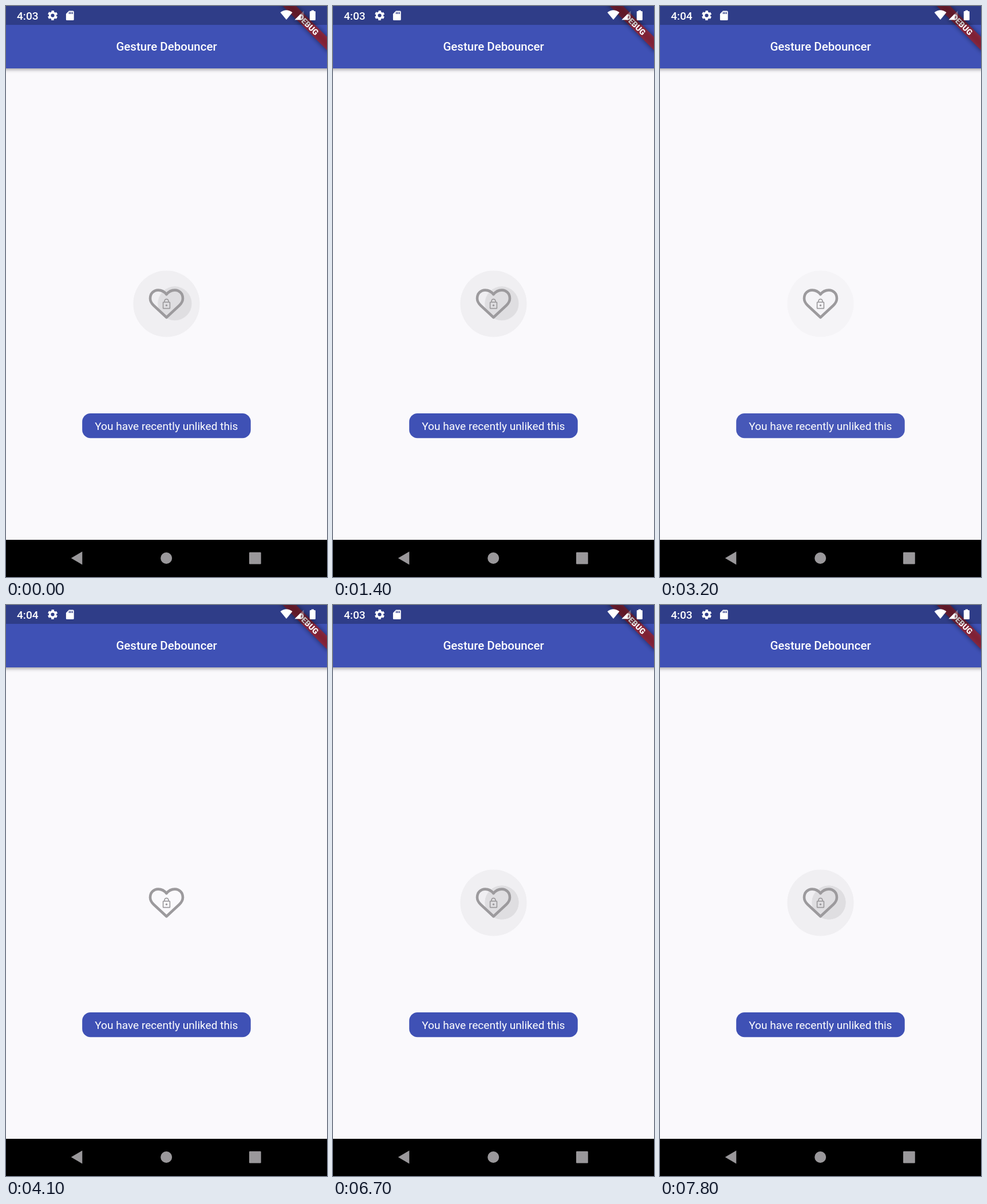
Write an HTML page that moves like this. It is 561 px wide and 998 px high and loops after 8 s.

```html
<!DOCTYPE html>
<html lang="en">
<head>
<meta charset="utf-8">
<title>Gesture Debouncer</title>
<style>
  html, body { margin: 0; width: 100%; height: 100%; overflow: hidden; background: #faf9fc; }
  svg { display: block; width: 100vw; height: 100vh; }
  text { font-family: Roboto, "Open Sans", sans-serif; fill: #fff; }
  .mid { text-anchor: middle; }
  .medium { font-weight: 500; }
  .bar { fill: #3f51b5; filter: drop-shadow(0 2px 3px rgba(0, 0, 0, .38)); }
  .line { fill: none; stroke: #9c9a9d; }

  .early, .late, .toast, .highlight, .ripple { animation: 8s linear infinite; }
  .early { animation-name: early; animation-timing-function: step-end; }
  .late { animation-name: late; animation-timing-function: step-end; }
  .toast { animation-name: toast; }
  .highlight { animation-name: highlight; }
  .ripple { animation-name: ripple; transform-origin: 280.5px 520.5px; }

  @keyframes early { 0%, 58.125% { opacity: 1 } 20% { opacity: 0 } }
  @keyframes late { 0%, 58.125% { opacity: 0 } 20% { opacity: 1 } }

  /* Each tap replaces the toast with a new one that fades in over 350 ms. */
  @keyframes toast {
    0% { opacity: 1; animation-timing-function: step-end }
    22.9% { opacity: 0; animation-timing-function: ease-in }
    27.275% { opacity: 1; animation-timing-function: step-end }
    35.75% { opacity: 0; animation-timing-function: ease-in }
    40.125%, 100% { opacity: 1 }
  }

  @keyframes highlight {
    0%, 22.375% { opacity: 1 }
    24.875%, 34.25% { opacity: 0 }
    35.875% { opacity: .65 }
    38.375% { opacity: 0; animation-timing-function: step-end }
    58.125%, 100% { opacity: 1 }
  }

  /* Held press, release, fade; then a short second tap. */
  @keyframes ripple {
    0% { transform: translate(14.5px, -.5px) scale(.51); opacity: 1; animation-timing-function: step-end }
    22.375% { transform: translate(14.5px, -.5px) scale(.51); opacity: 1; animation-timing-function: ease }
    25.1875% { transform: none; opacity: 1 }
    27.0625% { transform: none; opacity: 0; animation-timing-function: step-end }
    34.25% { transform: translate(14.5px, -.5px) scale(.3); opacity: 0 }
    35.1875% { transform: translate(13.5px, -.5px) scale(.35); opacity: 1 }
    35.875% { transform: translate(12.6px, -.4px) scale(.39); opacity: 1; animation-timing-function: ease }
    38.6875% { transform: none; opacity: 1 }
    40.5625% { transform: none; opacity: 0; animation-timing-function: step-end }
    58.125%, 100% { transform: translate(14.5px, -.5px) scale(.51); opacity: 1 }
  }
</style>
</head>
<body>
<svg viewBox="0 0 561 998">
  <defs>
    <clipPath id="button"><circle cx="280.5" cy="520.5" r="58.3"/></clipPath>
    <filter id="soft" x="-20%" y="-150%" width="140%" height="400%"><feGaussianBlur stdDeviation="4.5"/></filter>
  </defs>

  <rect width="561" height="998" fill="#faf9fc"/>
  <rect class="bar" x="-12" y="-12" width="585" height="121"/>
  <text class="mid medium" x="280.5" y="78" font-size="20.5">Gesture Debouncer</text>

  <g transform="translate(561 0) rotate(45)">
    <rect x="-60" y="38.2" width="120" height="16.4" opacity=".5" filter="url(#soft)"/>
    <rect x="-60" y="38.2" width="120" height="16.4" fill="#b71c1c" fill-opacity=".627"/>
    <text class="mid" y="51.3" font-size="13.9" font-weight="900">DEBUG</text>
  </g>

  <!-- Status bar -->
  <rect width="561" height="33" fill-opacity=".25"/>
  <g class="medium" font-size="19.1">
    <text class="early" x="19" y="24">4:03</text>
    <text class="late" x="19" y="24">4:04</text>
  </g>
  <g fill="none" stroke="#fff">
    <circle cx="81.5" cy="16.5" r="4.9" stroke-width="3.6"/>
    <circle cx="81.5" cy="16.5" r="7.2" stroke-width="2.8" stroke-dasharray="4.2 3.34" stroke-dashoffset="-1.67"/>
  </g>
  <path d="M110 8.6H117a1.7 1.7 0 0 1 1.7 1.7V23.4a1.7 1.7 0 0 1-1.7 1.7H106.600a1.700 1.700 0 0 1-1.700-1.700V13.700Z" fill="#fff"/>
  <path d="M110.600 10.600v3.400M113.300 10.600v3.400M116 10.600v3.400" stroke="#2f3d88" stroke-width="1.500"/>
  <g fill="#fff">
    <path d="M490 24L479.500 11.200Q490 3.400 500.500 11.200Z"/>
    <path d="M504.500 24.300H520.500V8.300Z" opacity=".3"/>
    <path d="M504.500 24.300H515V13.800Z"/>
    <path d="M533.700 9V7.500H538V9H539.700a1.200 1.200 0 0 1 1.200 1.200V23.700a1.200 1.200 0 0 1-1.200 1.200H532a1.200 1.200 0 0 1-1.200-1.200V10.200A1.200 1.200 0 0 1 532 9Z"/>
  </g>

  <!-- Like button -->
  <g clip-path="url(#button)">
    <circle class="highlight" cx="280.5" cy="520.5" r="58.3" fill-opacity=".04"/>
    <circle class="ripple" cx="280.5" cy="520.5" r="58.3" fill-opacity=".07"/>
  </g>
  <path class="line" stroke-width="4.6" stroke-linejoin="round" d="M280.5 544.300L258.200 523.500C254 519.500 252 515.500 252 511C252 502.800 258 496.600 266 496.600C271.500 496.600 276.800 499.200 280.500 504C284.200 499.200 289.500 496.600 295 496.600C303 496.600 309 502.800 309 511C309 515.500 307 519.500 302.800 523.500Z"/>
  <g class="line" stroke-width="1.7">
    <rect x="274.600" y="517.700" width="11.800" height="11" rx=".8"/>
    <path d="M277 517.700v-1.800a3.500 3.500 0 0 1 7 0v1.800"/>
  </g>
  <circle cx="280.5" cy="523.200" r="1.700" fill="#9c9a9d"/>

  <g class="toast">
    <rect x="133.200" y="712" width="294.500" height="43.300" rx="14.500" fill="#3f51b5"/>
    <text class="mid" x="280.300" y="740.800" font-size="19.1">You have recently unliked this</text>
  </g>

  <!-- Navigation bar -->
  <rect y="933" width="561" height="65"/>
  <g fill="#9a989b">
    <path d="M113.800 965L133.300 953.600V976.400Z"/>
    <circle cx="280.200" cy="965" r="10"/>
    <rect x="425" y="954.800" width="20.700" height="20.700" rx="1.200"/>
  </g>
</svg>
</body>
</html>
```
